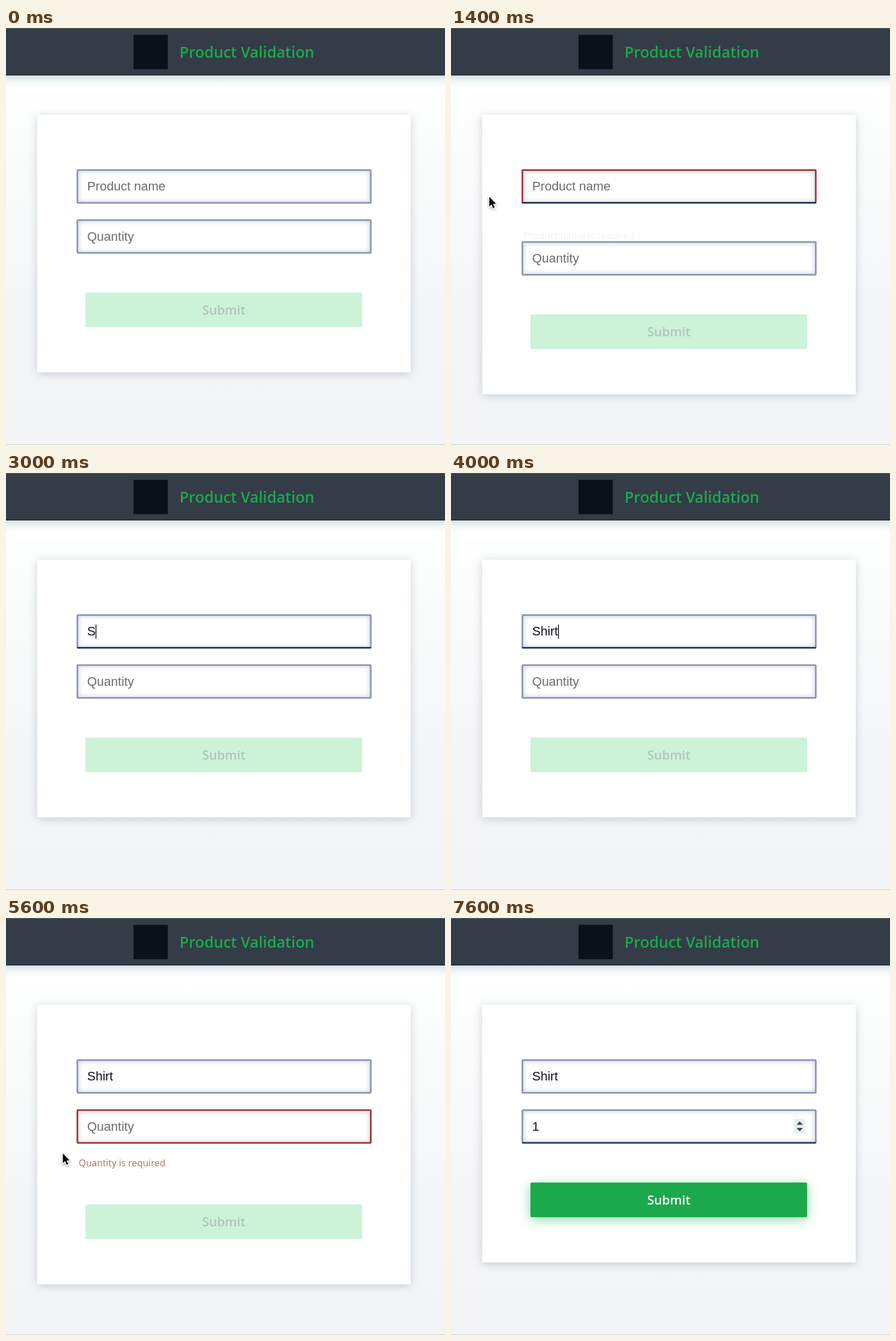
Animation, 768 px wide and 729 px high, one loop 8000 ms. Source, as an HTML page with a canvas:

```html
<!DOCTYPE html>
<html lang="en">
<head>
<meta charset="utf-8">
<title>Product Validation</title>
<style>
  html, body { margin: 0; width: 100%; height: 100%; overflow: hidden; background: #f4f5f7; }
  canvas { display: block; width: 768px; height: 729px; }
</style>
</head>
<body>
<canvas id="stage" width="768" height="729"></canvas>
<script>
const ctx = document.getElementById('stage').getContext('2d');
const LOOP = 8000, STEP = 200;
const GREEN = '#1ba94c', RED = '#a0302c', BORDER = '#8c95ae', FOCUS = '#22365a';
const INK = '#0e141e', HINT = '#6b6b6b';
const INPUT_FONT = '22px "Liberation Sans", Arial, sans-serif';
const ERROR_FONT = '16.4px "Open Sans", sans-serif';
const within = (t, a, b) => t >= a && t < b;

// Pointer stops [time, x, y]; each path is visible from its first stop to its last.
const paths = [
  [[200, 230, 325], [600, 186, 283], [800, 186, 283], [1200, 67, 295], [1600, 67, 295], [2200, 180, 282], [3000, 180, 282]],
  [[4400, 184, 300], [4800, 180, 356], [5200, 180, 356], [5400, 99.5, 411.5], [5800, 99.5, 411.5], [6400, 165, 374], [7000, 165, 374]]
];

// Typing: [time, text], with the caret blinking from each key press.
const nameKeys = [[3000, 'S'], [3200, 'Sh'], [3400, 'Shi'], [3800, 'Shir'], [4000, 'Shirt']];
const typed = (keys, t) => keys.reduce((text, [at, next]) => t >= at ? next : text, '');
const caretOn = (t, marks) => {
  const last = Math.max(...marks.filter(m => m <= t));
  return (t - last) % 1000 < 500;
};

function rounded(x, y, w, h, r) {
  ctx.beginPath();
  ctx.roundRect(x, y, w, h, r);
}

function verticalFade(y0, y1, stops) {
  const fade = ctx.createLinearGradient(0, y0, 0, y1);
  stops.forEach(([at, color]) => fade.addColorStop(at, color));
  ctx.fillStyle = fade;
  ctx.fillRect(0, y0, 768, y1 - y0);
}

function label(text, x, y, font, color, align = 'left') {
  ctx.font = font;
  ctx.fillStyle = color;
  ctx.textAlign = align;
  ctx.fillText(text, x, y);
}

function withShadow(color, blur, dy, paint) {
  ctx.save();
  ctx.shadowColor = color;
  ctx.shadowBlur = blur;
  ctx.shadowOffsetY = dy;
  paint();
  ctx.restore();
}

function drawPage() {
  verticalFade(83, 729, [[0, '#fff'], [0.05, '#fdfefe'], [0.22, '#fafbfb'], [0.4, '#f8f9fa'], [0.6, '#f4f5f7'], [1, '#f3f4f6']]);
  verticalFade(83, 118, [[0, '#d5dfe4'], [0.15, '#e6edf0'], [0.4, '#f7fafa'], [0.6, '#fff'], [1, '#fff']]);
  ctx.fillStyle = '#343c47';
  ctx.fillRect(0, 0, 768, 83);
  ctx.fillStyle = '#50584f';
  ctx.fillRect(0, 0, 768, 1.5);
  ctx.fillStyle = '#242c36';
  ctx.fillRect(0, 81.5, 768, 1.5);
  ctx.fillStyle = '#c6cbce';
  ctx.fillRect(0, 728, 768, 1);
  ctx.fillStyle = '#0b111b';
  ctx.fillRect(223, 12, 60, 60);
  label('Product Validation', 303.5, 51.5, '600 26.5px "Open Sans", sans-serif', GREEN);
}

function drawCard(bottom) {
  withShadow('rgba(70,100,120,.28)', 15, 3, () => {
    ctx.fillStyle = '#fff';
    rounded(54.5, 151.5, 653.5, bottom - 151.5, 1);
    ctx.fill();
  });
}

function drawField(y, { text, hint, invalid, underline, caret, spinner }) {
  const x = 123.5, w = 516, h = 60;
  ctx.save();
  rounded(x, y, w, h, 2.5);
  ctx.clip();
  ctx.fillStyle = '#fff';
  ctx.fillRect(x, y, w, h);
  withShadow('rgba(110,125,180,.45)', 8, 0, () => {
    ctx.strokeStyle = invalid ? RED : BORDER;
    ctx.lineWidth = 5.6;
    rounded(x, y, w, h, 2.5);
    ctx.stroke();
  });
  if (underline) {
    ctx.fillStyle = FOCUS;
    ctx.fillRect(x + 1, y + h - 2.8, w - 2, 2.8);
  }
  ctx.restore();

  label(text || hint, 142, y + 37, INPUT_FONT, text ? INK : HINT);
  if (caret) {
    ctx.fillStyle = INK;
    ctx.fillRect(142 + ctx.measureText(text).width, y + 18, 1.5, 24.5);
  }
  if (spinner) {
    ctx.fillStyle = '#e9edee';
    ctx.fillRect(600, y + 17, 20, 25.5);
    ctx.fillStyle = '#3d474b';
    [-1, 1].forEach(dir => {
      const base = y + 29.8 + dir * 2.8;
      ctx.beginPath();
      ctx.moveTo(604.5, base);
      ctx.lineTo(615.5, base);
      ctx.lineTo(610, base + dir * 6);
      ctx.fill();
    });
  }
}

function drawError(text, y, age) {
  ctx.globalAlpha = Math.min(1, 0.08 + 0.0032 * age);
  label(text, 127.2, y + Math.max(0, 32 - 0.11 * age), ERROR_FONT, '#97302d');
  ctx.globalAlpha = 1;
}

function drawButton(y, progress) {
  const paint = () => { rounded(139, y, 484, 60.5, 2.5); ctx.fill(); };
  ctx.fillStyle = '#ccf2d8';
  paint();
  ctx.globalAlpha = progress;
  ctx.fillStyle = GREEN;
  if (progress) withShadow('rgba(27,169,76,.5)', 20, 4, paint);
  ctx.globalAlpha = 1;
  const font = '600 22px "Open Sans", sans-serif';
  label('Submit', 381, y + 38.5, font, progress ? '#fff' : '#b1c4bb', 'center');
}

function drawArrow(x, y) {
  ctx.save();
  ctx.translate(x, y);
  ctx.beginPath();
  [[0, 0], [0, 17], [3.8, 13.4], [6.6, 20], [9.4, 18.8], [6.6, 12.4], [11.8, 12.2]]
    .forEach(([px, py]) => ctx.lineTo(px, py));
  ctx.closePath();
  ctx.lineJoin = 'round';
  ctx.strokeStyle = '#fff';
  ctx.lineWidth = 2.6;
  withShadow('rgba(0,0,0,.35)', 4, 2, () => ctx.stroke());
  ctx.fillStyle = '#05070c';
  ctx.fill();
  ctx.restore();
}

function drawBeam(x, y) {
  ctx.save();
  ctx.translate(x, y);
  ctx.beginPath();
  [-1, 1].forEach(s => {
    ctx.moveTo(-4.5, s * 10.5);
    ctx.quadraticCurveTo(0, s * 10.5, 0, s * 7.5);
    ctx.quadraticCurveTo(0, s * 10.5, 4.5, s * 10.5);
  });
  ctx.moveTo(0, -8);
  ctx.lineTo(0, 8);
  ctx.moveTo(-3, 3.5);
  ctx.lineTo(3, 3.5);
  [['rgba(255,255,255,.9)', 3.6], ['#15181c', 1.6]].forEach(([color, width]) => {
    ctx.strokeStyle = color;
    ctx.lineWidth = width;
    ctx.stroke();
  });
  ctx.restore();
}

function drawPointer(t, quantityTop) {
  const path = paths.find(p => within(t, p[0][0], p[p.length - 1][0]));
  if (!path) return;
  const i = path.findIndex(stop => stop[0] > t);
  const [t0, x0, y0] = path[i - 1], [t1, x1, y1] = path[i];
  const k = (t - t0) / (t1 - t0), ease = k * k * (3 - 2 * k);
  const x = x0 + (x1 - x0) * ease, y = y0 + (y1 - y0) * ease;
  const overField = within(x, 123, 640) && [247, quantityTop].some(top => within(y, top, top + 60));
  (overField ? drawBeam : drawArrow)(x, y);
}

function draw(t) {
  const nameError = within(t, 1400, 3000);
  const quantityError = within(t, 5400, 7000);
  const nameFocus = within(t, 600, 1400) || within(t, 2200, 4800);
  const quantityFocus = within(t, 4800, 5400) || t >= 6400;
  const shift = nameError || quantityError ? 38.3 : 0;
  const quantityTop = 334.5 + (nameError ? shift : 0);

  drawPage();
  drawCard(602 + shift);
  if (nameError) drawError('Product name is required', 336.8, t - 1400);
  if (quantityError) drawError('Quantity is required', 424.3, t - 5400);
  drawField(247, {
    text: typed(nameKeys, t),
    hint: 'Product name',
    invalid: nameError,
    underline: within(t, 800, 1600) || within(t, 2400, 5400),
    caret: nameFocus && caretOn(t, [600, 2200, ...nameKeys.map(key => key[0])])
  });
  drawField(quantityTop, {
    text: typed([[7000, '1']], t),
    hint: 'Quantity',
    invalid: quantityError,
    underline: within(t, 5000, 5400) || t >= 6600,
    caret: quantityFocus && caretOn(t, [4800, 6400, 7050].map(m => m === 7050 && t === 7000 ? 7000 : m)),
    spinner: quantityFocus || within(t, 4600, 4800)
  });
  drawButton(462.5 + shift, Math.max(0, Math.min(1, (t - 6900) / 200)));
  drawPointer(t, quantityTop);
}

function tick() {
  draw(Math.floor(performance.now() % LOOP / STEP) * STEP);
  requestAnimationFrame(tick);
}
tick();
</script>
</body>
</html>
```
